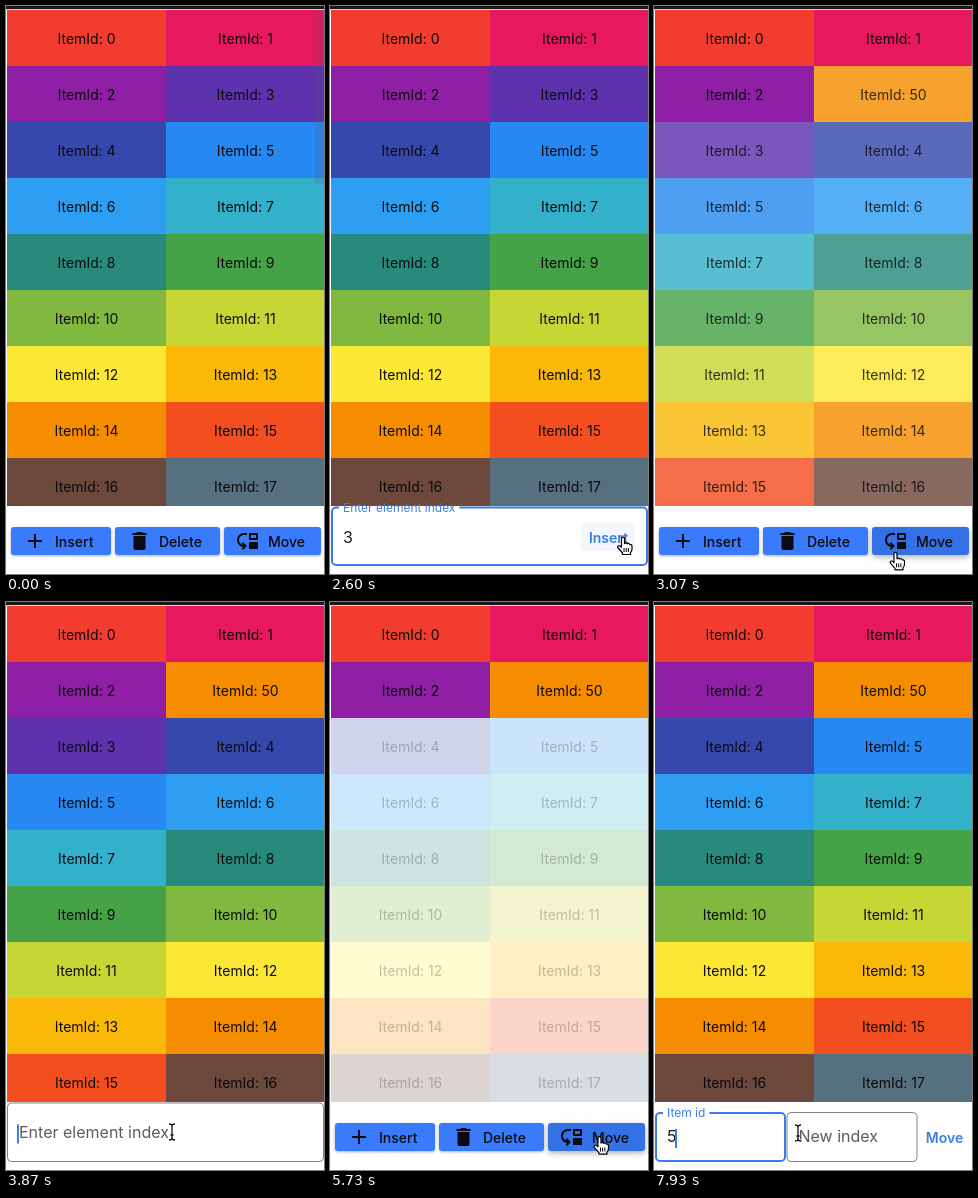
Recreate the animation shown at these times as an HTML page with a canvas. Size 318x568 px, loop 8000 ms.

```html
<!DOCTYPE html>
<html lang="en">
<head>
<meta charset="utf-8">
<title>Grid list</title>
<style>
html, body { margin: 0; width: 100%; height: 100%; overflow: hidden; background: #fff; }
canvas { display: block; width: 318px; height: 568px; }
</style>
</head>
<body>
<canvas id="stage"></canvas>
<script>
const W = 318, H = 568, LOOP = 8000;
const canvas = document.getElementById('stage');
const ctx = canvas.getContext('2d');
const dpr = window.devicePixelRatio || 1;
canvas.width = W * dpr;
canvas.height = H * dpr;

const BLUE = '#3b7de6', GRAY = '#857f88', INK = '#0b0b0d';
const COLORS = ['#f33c30', '#e6195c', '#8f20a6', '#5d32ac', '#3748ac', '#2688f0',
  '#2e9ef2', '#33b1ca', '#288a7b', '#45a246', '#80b840', '#c6d634',
  '#fde735', '#fab908', '#f68d00', '#f34e20', '#6c483d', '#577080'];

const ids = [...Array(18).keys()];
const inserted = [0, 1, 2, 50, ...ids.slice(3, 17)];
const removed = [0, 1, 2, 50, ...ids.slice(4)];

// Moments at which the interface changes
const T = {
  openInsert: 1000, focusInsert: 1400, typeInsert: 2050, insert: 2660,
  openDelete: 3600, focusDelete: 3850, typeDelete: 4350, remove: 5270,
  openMove: 6600, focusMove: 7050, typeMove: 7500
};

// Pointer path: time, x, y
const PATH = [[300, 62, 572], [800, 68, 533], [1050, 68, 533], [1400, 120, 529],
  [1950, 125, 529], [2450, 293, 531], [2660, 293, 531], [2800, 285, 535],
  [3150, 235, 548], [3480, 168, 532], [3600, 166, 530], [4500, 166, 530],
  [5050, 271, 532], [5600, 271, 532], [6100, 262, 547], [6400, 246, 539],
  [6600, 246, 539], [6950, 62, 535], [7550, 62, 535], [7930, 144, 531]];

const PLUS = new Path2D('M19 13h-6v6h-2v-6H5v-2h6V5h2v6h6v2z');
const TRASH = new Path2D('M6 19c0 1.1.9 2 2 2h8c1.1 0 2-.9 2-2V7H6v12zM19 4h-3.5l-1-1h-5l-1 1H5v2h14V4z');
const MOVE = new Path2D('M3 11c0 2.45 1.76 4.47 4.08 4.91l-1.49-1.49L7 13l4 4.01L7 21l-1.41-1.41 1.58-1.58v-.06C3.7 17.54 1 14.58 1 11c0-3.87 3.13-7 7-7h3v2H8c-2.76 0-5 2.24-5 5zm19 0V4h-9v7h9zm-2-2h-5V6h5v3zM13 13h9v7h-9z');
const HAND = new Path2D('M-1.5 1Q0-.7 1.5 1V6.5Q3 5 4.3 6.8Q6 5.7 7 7.7Q9 7 9 9.5V12Q9 14 7.5 15.5V17.5H-.5V16L-5.3 10.5Q-5.5 8.3-3.3 8.8L-1.5 10.2Z');
const ARROW = new Path2D('M0 0V15L3.5 12L6 17.5L8.3 16.5L6 11.2H10.5Z');
const IBEAM = new Path2D('M-3-8Q0-8 0-6Q0-8 3-8M0-6V6M-3 8Q0 8 0 6Q0 8 3 8M-1.5 3H1.5');

const BUTTONS = [
  { text: 'Insert', x: 5, w: 100, icon: PLUS, iconX: 17, textX: 49 },
  { text: 'Delete', x: 109, w: 105, icon: TRASH, iconX: 121.5, textX: 153 },
  { text: 'Move', x: 218, w: 97, icon: MOVE, iconX: 230, textX: 262 }
];

const clamp = v => Math.max(0, Math.min(1, v));
const progress = (t, from, to) => clamp((t - from) / (to - from));
const ease = p => p * p * (3 - 2 * p);
const mix = (a, b, p) => a + (b - a) * p;

function text(str, x, y, size, color, weight = 400, align = 'left') {
  ctx.font = `${weight} ${size}px Inter, sans-serif`;
  ctx.textAlign = align;
  ctx.fillStyle = color;
  ctx.fillText(str, x, y);
}

function rect(x, y, w, h, color) {
  ctx.fillStyle = color;
  ctx.fillRect(x, y, w, h);
}

function round(x, y, w, h, r) {
  ctx.beginPath();
  ctx.roundRect(x, y, w, h, r);
}

function pointerAt(t) {
  if (t < PATH[0][0]) return null;
  const i = PATH.findIndex(k => k[0] > t);
  if (i < 0) return PATH[PATH.length - 1].slice(1);
  const a = PATH[i - 1], b = PATH[i];
  const p = ease(progress(t, a[0], b[0]));
  return [mix(a[1], b[1], p), mix(a[2], b[2], p)];
}

function listAt(t) {
  if (t < T.insert) return [ids, 1];
  if (t < 2800) return [ids, 1 - progress(t, T.insert, 2780)];
  if (t < T.remove) return [inserted, ease(progress(t, 2810, 3170))];
  if (t < 5630) return [inserted, 1 - progress(t, 5330, 5630) ** 1.05];
  return [removed, ease(progress(t, 5630, 5950))];
}

function drawList(t) {
  const [list, alpha] = listAt(t);
  ctx.save();
  ctx.beginPath();
  ctx.rect(1, 4, 317, 496);
  ctx.clip();
  list.forEach((id, i) => {
    const right = i % 2, y = 4 + 56 * (i >> 1);
    const kept = i < 3 || (i === 3 && t >= T.remove);
    ctx.globalAlpha = kept ? 1 : alpha;
    rect(right ? 160 : 1, y, right ? 158 : 159, 56, COLORS[id % 18]);
    text(`ItemId: ${id}`, right ? 239.5 : 80.5, y + 34, 14, INK, 400, 'center');
  });
  ctx.globalAlpha = 1 - progress(t, 70, 450);
  rect(309, 4, 9, 174, 'rgba(95,80,120,.2)');
  ctx.restore();
}

function inButton(p, b) {
  return p && p[0] >= b.x && p[0] <= b.x + b.w && p[1] >= 521 && p[1] <= 549;
}

function drawButtons(pointer) {
  for (const b of BUTTONS) {
    const hover = inButton(pointer, b);
    ctx.save();
    ctx.shadowColor = 'rgba(0,0,0,.32)';
    ctx.shadowBlur = (hover ? 6 : 3) * dpr;
    ctx.shadowOffsetY = (hover ? 2 : 1) * dpr;
    round(b.x, 521, b.w, 28, 3);
    ctx.fillStyle = hover ? '#3470e6' : '#3a7bfd';
    ctx.fill();
    ctx.restore();
    ctx.save();
    ctx.translate(b.iconX, 523);
    ctx.fillStyle = INK;
    ctx.fill(b.icon);
    ctx.restore();
    text(b.text, b.textX, 541, 14, INK, 500);
  }
}

// Outlined text field whose label floats up on focus
function drawField(f, t) {
  const focused = t >= f.focus;
  const p = ease(progress(t, f.focus + 40, f.focus + 190));
  const active = p > 0;
  const inset = active ? 1 : .5;
  round(f.x + inset, f.y + inset, f.w - 2 * inset, f.h - 2 * inset, 4);
  ctx.strokeStyle = active ? BLUE : GRAY;
  ctx.lineWidth = 2 * inset;
  ctx.stroke();
  const size = mix(16, 12, p);
  if (active) {
    ctx.font = '400 12px Inter, sans-serif';
    rect(f.x + 8, f.y - .5, (ctx.measureText(f.label).width + 8) * p, 3, '#fff');
  }
  text(f.label, f.x + 12, mix(f.base, f.y + 5, p), size, active ? BLUE : '#5f5961');
  const typed = t >= f.type;
  if (typed) text(f.value, f.x + 12, f.base + 1 - (f.h < 55), 16, '#1b1a1e');
  const since = t - (typed ? f.type : f.focus);
  if (focused && since % 1060 < 530) {
    const x = typed ? f.x + 20 : f.x + 10;
    rect(x, f.base - 13, 2, 19, BLUE);
  }
}

function drawEntry(t, pointer, action, focus, type) {
  drawField({ x: 1, y: 500.5, w: 317, h: 59.5, base: 535.5, label: 'Enter element index', value: '3', focus, type }, t);
  if (t < type) return;
  if (pointer[0] > 251 && pointer[0] < 305) {
    round(251, 517, 54, 28, 4);
    ctx.fillStyle = '#f3f6fd';
    ctx.fill();
  }
  text(action, 278.5, 537, 14, BLUE, 600, 'center');
}

function drawMoveForm(t) {
  const base = { y: 510, w: 131, h: 50, base: 540 };
  drawField({ ...base, x: 1, label: 'Item id', value: '5', focus: T.focusMove, type: T.typeMove }, t);
  drawField({ ...base, x: 132.5, label: 'New index', focus: LOOP, type: LOOP }, t);
  text('Move', 290.5, 541, 14, BLUE, 600, 'center');
}

function drawPointer(p, panel) {
  if (!p) return;
  const [x, y] = p;
  const onField = panel && x < (panel === 'move' ? 263 : 248);
  ctx.save();
  ctx.translate(x, y);
  ctx.lineJoin = 'round';
  if (onField) {
    for (const [color, width] of [['#fff', 3], ['#111', 1.3]]) {
      ctx.strokeStyle = color;
      ctx.lineWidth = width;
      ctx.stroke(IBEAM);
    }
  } else {
    const shape = panel || BUTTONS.some(b => inButton(p, b)) ? HAND : ARROW;
    const hand = shape === HAND;
    ctx.fillStyle = hand ? '#fff' : '#000';
    ctx.strokeStyle = hand ? '#000' : '#fff';
    ctx.lineWidth = 1.2;
    ctx.fill(shape);
    ctx.stroke(shape);
    if (hand) {
      ctx.beginPath();
      for (const lx of [1, 3.2, 5.4]) {
        ctx.moveTo(lx, 11);
        ctx.lineTo(lx, 15);
      }
      ctx.lineWidth = 1;
      ctx.stroke();
    }
  }
  ctx.restore();
}

function panelAt(t) {
  if (t >= T.openMove) return 'move';
  if (t >= T.openDelete && t < T.remove) return 'delete';
  if (t >= T.openInsert && t < T.insert) return 'insert';
  return null;
}

function draw(t) {
  const pointer = pointerAt(t), panel = panelAt(t);
  ctx.setTransform(dpr, 0, 0, dpr, 0, 0);
  rect(0, 0, W, H, '#fff');
  rect(0, 0, 1, H, '#f5f5f5');
  rect(0, 0, W, 3, '#1b151d');
  rect(0, 3, W, 1, '#d9d5da');
  drawList(t);
  if (!panel) drawButtons(pointer);
  else if (panel === 'insert') drawEntry(t, pointer, 'Insert', T.focusInsert, T.typeInsert);
  else if (panel === 'delete') drawEntry(t, pointer, 'Delete', T.focusDelete, T.typeDelete);
  else drawMoveForm(t);
  drawPointer(pointer, panel);
}

const start = performance.now();
function tick() {
  draw((performance.now() - start) % LOOP);
  requestAnimationFrame(tick);
}
tick();
</script>
</body>
</html>
```
